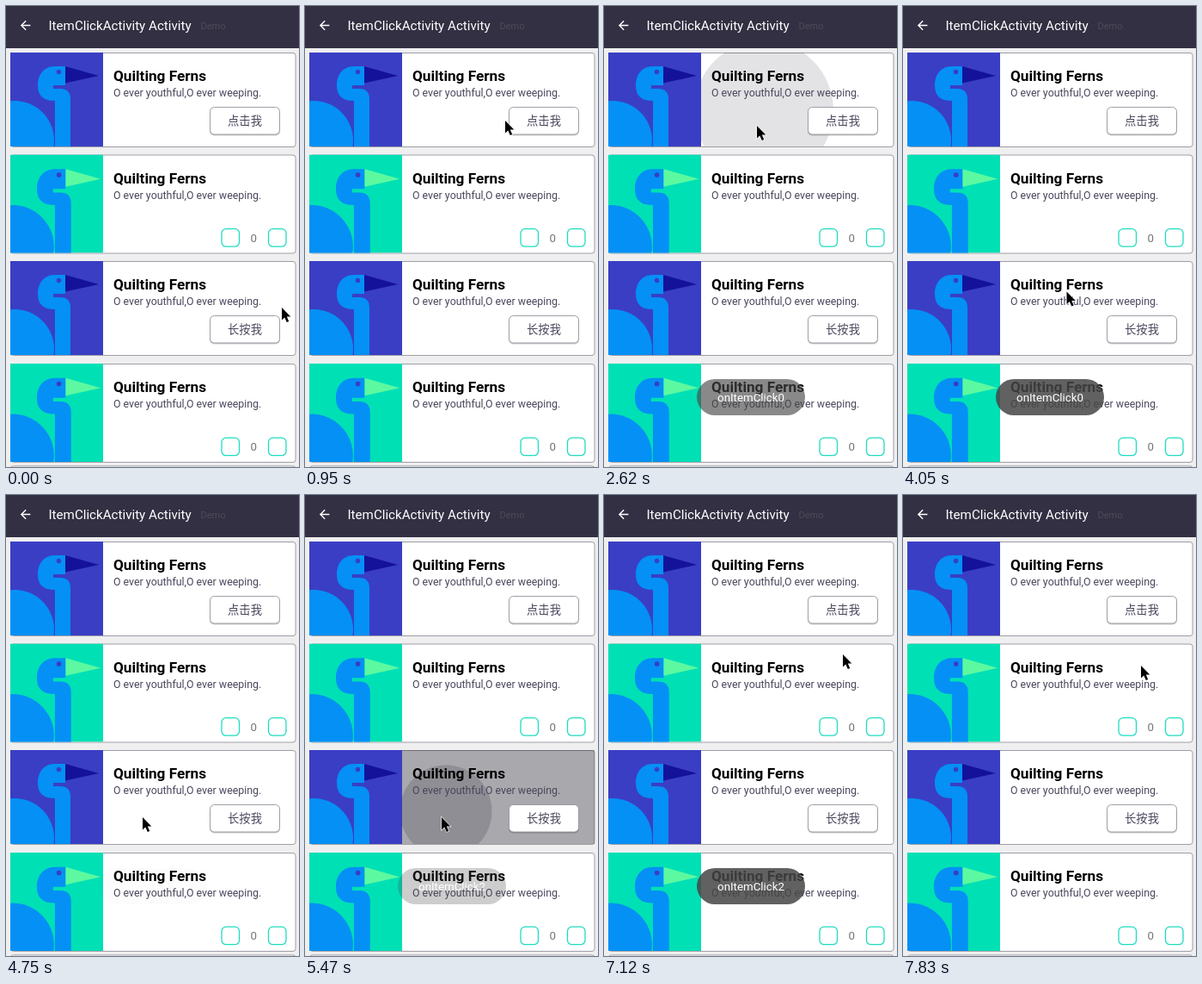
An HTML page that plays this animation: 341x535 px, repeating every 8000 ms.

```html
<!DOCTYPE html>
<html lang="en">
<head>
<meta charset="utf-8">
<title>Item click demo</title>
<style>
  html, body { margin: 0; height: 100%; overflow: hidden; background: #efeff0; }
  svg { display: block; font-family: Roboto, "Noto Sans CJK SC", "Noto Sans CJK", sans-serif; }
  #stage { width: 100vw; height: 100vh; }
  .frame { fill: #fff; stroke: #96949d; stroke-width: .9; }
  .title { font-size: 17.2px; font-weight: 700; }
  .sub { font-size: 12.4px; fill: #4a465c; }
  .mid { text-anchor: middle; font-size: 13.3px; }
</style>
</head>
<body>
<svg id="stage" viewBox="0 0 341 535" preserveAspectRatio="none"></svg>
<script>
const LOOP = 8000, STEP = 118.6;
const stage = document.getElementById('stage');

const bird = (height, back, beak) => `
  <svg x="5" width="108" height="${height}">
    <rect width="108" height="${height}" fill="${back}"/>
    <g transform="translate(54) scale(${height / 109}) translate(-54)">
      <g fill="#0490f5">
        <circle cx="5" cy="102" r="46"/>
        <path d="M64 16H52C38 16 32 27 32 38C32 50 38 56 52 56V110H70V54C70 46 66 42 58 42H50V38H64Z"/>
      </g>
      <path d="M64 16L103 27L64 35.5Z" fill="${beak}"/>
      <circle cx="56.5" cy="22.5" r="2.7" fill="#383dc2"/>
    </g>
  </svg>`;

const button = label => `
  <rect x="237" y="64" width="82" height="32.5" rx="5" opacity=".2"/>
  <rect x="237.5" y="63.5" width="81" height="31.5" rx="5" class="frame"/>
  <text x="278" y="84.3" class="mid" fill="#4a465c">${label}</text>`;

const box = x => `<rect x="${x}" y="86.2" width="20.5" height="20.5" rx="5" fill="none" stroke="#1fdcc0" stroke-width="1.3"/>`;
const stepper = box(251) + box(305.5) + '<text x="288.3" y="101.3" class="mid" fill="#757575">0</text>';

const card = (y, height, picture, controls, pressId = '') => `
  <g transform="translate(0 ${y})">
    <rect x="5.5" y=".5" width="331.5" height="${height}" rx="3" class="frame"/>
    <svg x="113" width="224" height="${height}"><g id="${pressId}"></g></svg>
    ${picture}
    <text x="125" y="33" class="title">Quilting Ferns</text>
    <text x="125" y="51" class="sub">O ever youthful,O ever weeping.</text>
    ${controls}
  </g>`;

const blue = bird(109, '#3a3ec4', '#14129a');
const green = bird(114, '#00e0b5', '#5cf9a0');

stage.innerHTML = `
  <rect width="341" height="535" fill="#efeff0"/>
  <rect width="341" height="49" fill="#333043"/>
  <path transform="translate(14 13.9) scale(.72)" fill="#fff"
    d="M20 11H7.83l5.59-5.59L12 4l-8 8 8 8 1.41-1.41L7.83 13H20z"/>
  <text x="49.5" y="28" font-size="15.15" fill="#fff">ItemClickActivity Activity</text>
  <text x="226.5" y="27" font-size="11" fill="#4d4b59">Demo</text>
  ${card(54, 109, blue, button('点击我'), 'tapped')}
  ${card(172.5, 114, green, stepper)}
  ${card(296, 109, blue, button('长按我'), 'held')}
  ${card(415, 114, green, stepper)}
  <rect x="5.5" y="533.9" width="331.5" height="20" rx="3" class="frame"/>
  <g id="toast">
    <rect x="108" y="433" width="126" height="42" rx="21" fill="#464646" fill-opacity=".85"/>
    <text id="message" x="171" y="459" class="mid" fill="#fff"></text>
  </g>
  <path id="cursor" d="M0 0V14.6L3.3 11.6L5.8 17L8.2 16L5.8 10.6H10.3Z" stroke="#fff" stroke-width="1.2" paint-order="stroke"/>`;

const [toast, message, cursor, tapped, held] =
  ['toast', 'message', 'cursor', 'tapped', 'held'].map(id => document.getElementById(id));

// Pointer glides: leaving step, arriving step, destination.
const glides = [
  [0, 2, 290, 234], [3, 5, 294, 143], [7, 9, 172, 123], [13, 15, 217, 169], [15, 17, 178, 139],
  [23, 25, 210, 158], [26, 31, 217, 237], [32, 34, 190.5, 331.5], [36, 40, 159, 374],
  [47, 50, 212.5, 297], [51, 53, 270, 196], [55, 57, 279, 172], [59, 61, 277, 198]
];

const clamp = v => Math.max(0, Math.min(1, v));
const shadeFill = alpha => `fill="#1e1e28" fill-opacity="${alpha}"`;
const ripple = (x, y, age, alpha) =>
  `<circle cx="${x}" cy="${y}" r="${26 + 27.5 * age}" ${shadeFill(alpha)}/>`;

function pointerAt(step) {
  let x = 321, y = 350;
  for (const [leave, arrive, toX, toY] of glides) {
    const p = clamp((step - leave) / (arrive - leave));
    x += (toX - x) * p;
    y += (toY - y) * p;
  }
  return `translate(${x} ${y})`;
}

// The ripple slides from the touch point towards the card centre as it grows.
function drawTap(age) {
  const alpha = age < 0 ? 0 : .12 * clamp((4 - age) / 2);
  tapped.innerHTML = alpha ? ripple(66 + 3.5 * age, 83 - 8 * age, age, alpha) : '';
}

function drawHold(age) {
  const shade = .38 * clamp(1 - Math.abs(age - 1) / 2);
  held.innerHTML = shade && age >= 0
    ? `<rect width="224" height="109" ${shadeFill(shade)}/>` +
      ripple(47 + 4 * age, 77 - 6 * age, age, shade / 2) : '';
}

function drawToast(time, start, text) {
  message.textContent = text;
  toast.setAttribute('opacity', Math.min(clamp((time - start) / 240), clamp((start + 2320 - time) / 400)));
}

function draw(t) {
  const step = Math.floor((t + 2) / STEP), time = step * STEP;
  cursor.setAttribute('transform', pointerAt(step));
  drawTap(step - 20);
  drawHold(step - 45);
  if (time < 5000) drawToast(time, 2430, 'onItemClick0');
  else drawToast(time, 5380, 'onItemClick2');
}

(function tick() {
  draw(performance.now() % LOOP);
  requestAnimationFrame(tick);
})();
</script>
</body>
</html>
```
